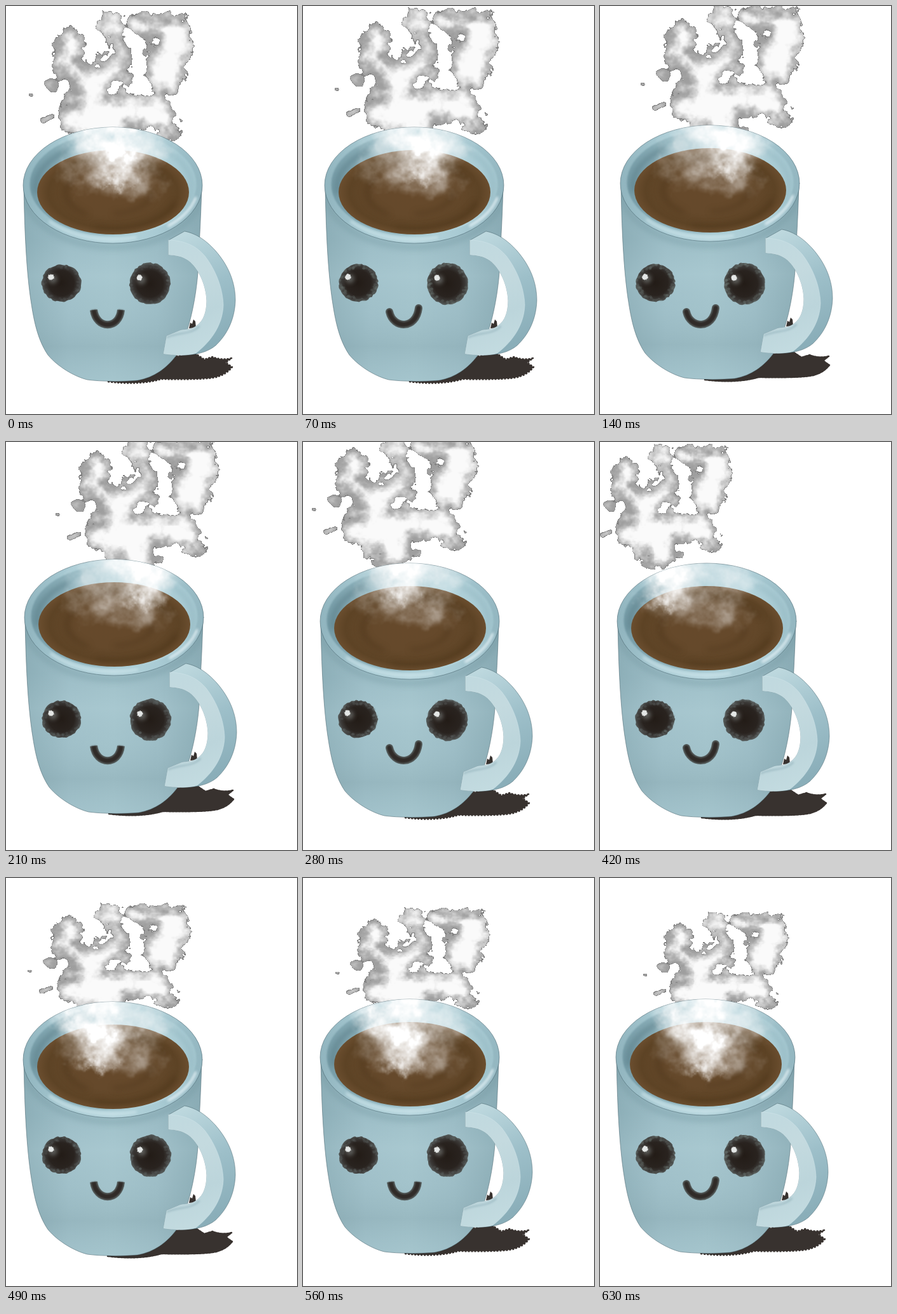
An HTML page with a canvas that plays this animation: 458 by 643 pixels, repeating every 700 ms.

```html
<!DOCTYPE html>
<html lang="en">
<head>
<meta charset="utf-8">
<title>Steaming mug</title>
<style>
  html, body { margin: 0; width: 100%; height: 100%; overflow: hidden; background: #fff; }
  canvas { display: block; }
</style>
</head>
<body>
<canvas id="stage" width="458" height="643"></canvas>
<script>
const W = 458, H = 643, STEP = 70, STEPS = 10;
const ctx = document.getElementById('stage').getContext('2d');
const clamp = v => Math.max(0, Math.min(1, v));
const smooth = v => { v = clamp(v); return v * v * (3 - 2 * v); };
const mix = (a, b, t) => a + (b - a) * t;

// --- noise ---
function hash(x, y) {
  let h = Math.imul(x, 374761393) ^ Math.imul(y, 668265263);
  h = Math.imul(h ^ (h >>> 13), 1274126177);
  return ((h ^ (h >>> 16)) >>> 0) / 4294967296;
}
function noise(x, y) {
  const i = Math.floor(x), j = Math.floor(y), u = smooth(x - i), v = smooth(y - j);
  return mix(mix(hash(i, j), hash(i + 1, j), u), mix(hash(i, j + 1), hash(i + 1, j + 1), u), v);
}
// fractal noise, about -1..1
function fbm(x, y, size) {
  let sum = 0, amp = 1;
  for (let o = 0; o < 4; o++, amp *= 0.58, size /= 2) sum += amp * (noise(x / size + o * 17, y / size + o * 31) - 0.5);
  return sum * 1.5;
}

// Builds a sprite from a rule returning [grey, alpha 0..1].
function sprite(w, h, rule) {
  const c = document.createElement('canvas');
  c.width = w; c.height = h;
  const g = c.getContext('2d'), img = g.createImageData(w, h);
  for (let y = 0, p = 0; y < h; y++) for (let x = 0; x < w; x++, p += 4) {
    const [v, a] = rule(x, y);
    img.data[p] = img.data[p + 1] = img.data[p + 2] = v;
    img.data[p + 3] = a * 255;
  }
  g.putImageData(img, 0, 0);
  return c;
}

// --- steam above the rim: strands through points x, y, radius ---
const strands = [
  [[167, 33, 22], [184, 70, 9], [186, 92, 11]],
  [[204, 27, 16], [264, 42, 26], [250, 108, 32], [262, 132, 10]],
  [[104, 54, 19], [98, 88, 20], [130, 122, 31], [180, 98, 20]],
  [[130, 122, 31], [126, 168, 30], [160, 205, 34]],
  [[104, 178, 22], [160, 168, 34], [240, 168, 25], [260, 198, 16]],
  [[68, 124, 8], [74, 130, 7]],
  [[58, 180, 6], [72, 172, 5]],
  [[38, 140, 3], [40, 140, 3]]
];
const segments = strands.flatMap(s => s.slice(1).map((b, i) => [s[i], b]));

// Signed distance inside a tapered segment, with a noisy edge.
function inside(x, y, [a, b], n) {
  const dx = b[0] - a[0], dy = b[1] - a[1];
  const t = clamp(((x - a[0]) * dx + (y - a[1]) * dy) / (dx * dx + dy * dy));
  const r = mix(a[2], b[2], t);
  return r - Math.hypot(x - a[0] - dx * t, y - a[1] - dy * t) + n * Math.min(13, r * 0.7);
}
const cloud = sprite(320, 245, (x, y) => {
  const n = fbm(x, y, 24);
  const depth = 4 * Math.log(segments.reduce((sum, s) => sum + Math.exp(inside(x, y, s, n) / 4), 0));
  if (depth < 0) return [0, 0];
  const t = smooth(depth / 30 + 0.15 + fbm(x + 400, y, 30) * 0.3);
  return [depth < 1 ? 130 : mix(158, 250, t), 1];
});

// --- steam inside the cup ---
const plume = sprite(200, 150, (x, y) => {
  const up = 140 - y, u = x - 100 - fbm(x, y, 30) * 18;
  const w = 26 + 26 * Math.sqrt(clamp(up / 60)) + Math.max(0, up - 55) * 0.4;
  const a = smooth(1.25 - Math.abs(u) / w) * smooth((up + fbm(x, y + 90, 18) * 16) / 30);
  return [255, clamp(a * (0.82 + fbm(x + 50, y, 24) * 0.5))];
});
const haze = sprite(220, 160, (x, y) => {
  const d = Math.hypot((x - 110) / 98, (y - 40) / 88);
  return [248, clamp(smooth((1.1 - d + fbm(x + 90, y, 36) * 0.3) * 1.6) * (0.36 + fbm(x, y + 30, 24) * 0.22))];
});

// --- drawing helpers ---
function gradient(x0, y0, x1, y1, ...stops) {
  const g = ctx.createLinearGradient(x0, y0, x1, y1);
  stops.forEach((c, i) => g.addColorStop(i / (stops.length - 1), c));
  return g;
}
function radial(r, ...stops) {
  const g = ctx.createRadialGradient(0, 0, 0, 0, 0, r);
  stops.forEach(([at, c]) => g.addColorStop(at, c));
  return g;
}
function arc(x, y, rx, ry, from = 0, to = Math.PI * 2) {
  const p = new Path2D();
  p.ellipse(x, y, rx, ry, 0, from, to);
  return p;
}
function paint(path, fill, stroke, width = 1) {
  if (fill) { ctx.fillStyle = fill; ctx.fill(path); }
  if (stroke) { ctx.strokeStyle = stroke; ctx.lineWidth = width; ctx.stroke(path); }
}
function blurred(px, draw) {
  ctx.save();
  ctx.filter = `blur(${px}px)`;
  draw();
  ctx.restore();
}
function ragged(rx, ry, jag, seed) {
  const p = new Path2D(), turn = Math.PI / 45;
  for (let i = 0; i < 90; i++) {
    const k = 1 - jag * noise(i / 1.7, seed);
    p.lineTo(Math.cos(i * turn) * rx * k, Math.sin(i * turn) * ry * k);
  }
  p.closePath();
  return p;
}

// --- mug ---
const body = new Path2D('M28 282C29 350 32 420 40 470C46 510 54 532 66 550C82 569 108 584 128 589C150 592 185 592 207 590C234 585 252 571 267 552C288 520 299 460 302 420C304 375 307 330 308 282Z');
const rim = arc(168, 282.5, 141, 91.5);
const well = arc(168.5, 281, 131, 81.5);
const coffee = arc(168.5, 293.5, 119.5, 66.5);
const innerEdge = 'L253 520L275 511L290 509C309 503 316 486 316 464C315 440 304 414 287 401C277 394 267 393 256 392Z';
const handleBack = new Path2D('M256 369L281 355C297 358 313 367 330 386C350 409 361 435 361 464C360 493 349 517 330 535C312 550 283 553 248 548' + innerEdge);
const handleFront = new Path2D('M256 369C283 370 299 378 313 394C330 416 341 444 342 471C341 500 326 526 299 547C287 551 268 551 248 548' + innerEdge);
const spike = new Path2D('M288 508L290 499L293 501L295 494L298 497L299 507Z');
const shadow = new Path2D('M160 592Q220 560 262 553T300 549L312 557L325 553Q340 559 355 555L346 562L356 569Q345 583 325 586T245 588Q210 598 160 592Z');

function drawMug() {
  ctx.lineJoin = 'round';
  ctx.setLineDash([3, 2]);
  paint(shadow, '#38322f', '#38322f', 2.5);
  ctx.setLineDash([]);
  paint(spike, '#38322f');
  paint(body, gradient(28, 0, 308, 0, '#90b1ba', '#a2c2cb', '#a6c6ce', '#9fbfc8', '#8cadb6'), 'rgba(70,95,104,.55)');
  ctx.save();
  ctx.clip(body);
  ctx.fillStyle = gradient(0, 370, 0, 592, 'rgba(120,158,168,.14)', 'rgba(180,210,217,.15)', 'rgba(140,172,180,.1)', 'rgba(120,152,160,.28)', 'rgba(160,194,202,.2)');
  ctx.fillRect(0, 280, W, 320);
  blurred(5, () => paint(arc(168, 288, 141, 92), null, 'rgba(100,136,148,.32)', 8));
  ctx.restore();

  paint(rim, gradient(27, 0, 309, 0, '#90b4be', '#a9cbd4', '#b6d5dd', '#a9cbd4', '#93b6c0'), 'rgba(75,104,114,.6)');
  ctx.lineCap = 'round';
  blurred(2, () => {
    paint(arc(168, 282, 134, 85, 0.25, 0.85), null, 'rgba(228,243,247,.85)', 5);
    paint(arc(168, 282, 134, 86, 1.3, 2.4), null, 'rgba(208,231,237,.75)', 4);
  });
  blurred(1, () => paint(well, gradient(38, 290, 299, 240, '#769ca7', '#8cb0ba', '#aacdd6', '#b4d4dc', '#a2c5ce')));
  blurred(4, () => {
    paint(arc(168, 284, 124, 75, -0.9, 0.45), null, 'rgba(128,166,178,.45)', 5);
    paint(arc(168, 286, 121, 72, 3.05, 4.05), null, 'rgba(80,114,125,.5)', 9);
  });
  drawCoffee();

  paint(handleBack, gradient(280, 360, 350, 520, '#bdd8de', '#9dbfc9', '#8aaeb9'), 'rgba(75,104,114,.55)');
  paint(handleFront, gradient(256, 370, 325, 545, '#c0d9df', '#c4dadf', '#bcd5db', '#c4dce1'), 'rgba(208,229,234,.6)');
  blurred(1.5, () => paint(new Path2D('M254 522C272 514 292 518 304 505'), null, 'rgba(130,164,175,.6)', 2));
}

function drawCoffee() {
  ctx.save();
  ctx.clip(coffee);
  ctx.translate(168.5, 293.5);
  ctx.scale(1, 0.557);
  ctx.fillStyle = radial(120, [0, '#66492b'], [0.55, '#65492b'], [0.85, '#5d4325'], [1, '#6b4e2f']);
  ctx.fillRect(-125, -125, 250, 250);
  ctx.filter = 'blur(5px)';
  for (let i = 0; i < 4; i++) {
    const r = 60 + i * 14, from = i * 2.2;
    paint(arc(0, 0, r, r, from, from + 1.5), null, 'rgba(62,40,16,.28)', 10);
  }
  ctx.restore();
}

// --- face ---
// tilt bends the mouth to one side, halo lightens the brushed rim of the eyes
const faces = {
  A: { tilt: 0, halo: 0.4 },
  B: { tilt: 1, halo: 1 },
  C: { tilt: 0, halo: 0.7 },
  D: { tilt: 1, halo: 0.8 }
};

function drawEye(x, y, rx, ry, halo, seed) {
  ctx.save();
  ctx.translate(x + hash(seed, 3) - 0.5, y + hash(seed, 4) - 0.5);
  paint(ragged(rx, ry, 0.07, seed), radial(rx, [0, '#231c17'], [0.62, '#29231f'], [0.84, '#3c3a38'], [1, '#59605f']));
  for (let k = 0; k < 60; k++) {
    const a = hash(k, seed) * 6.283, d = 0.76 + 0.18 * hash(k, seed + 40);
    paint(arc(Math.cos(a) * rx * d, Math.sin(a) * ry * d, 2.4, 2), `rgba(112,122,121,${0.26 * halo})`);
  }
  ctx.translate(-16.5, -9.5);
  blurred(3, () => paint(arc(3, 3, 7, 7), 'rgba(135,140,138,.55)'));
  paint(ragged(5.5, 5.5, 0.35, seed), '#e4e7e6');
  ctx.restore();
}

function drawFace(key) {
  const { tilt, halo } = faces[key], seed = key.charCodeAt(0);
  drawEye(87, 436.5, 32, 30.5, halo, seed);
  drawEye(227, 438, 33.5, 34, halo, seed + 9);
  const mouth = new Path2D(`M${138 - 2 * tilt} ${479 + 3 * tilt}C142 ${510 - tilt} 178 510 ${181 + tilt} ${479 - 3 * tilt}`);
  ctx.lineCap = tilt ? 'round' : 'butt';
  paint(mouth, null, 'rgba(72,74,72,.8)', 12);
  blurred(1, () => paint(mouth, null, '#302b28', 8));
}

// --- motion ---
const faceOrder = 'ABBCDDDCCB';
const shake = { 1: [7, 0], 2: [5, -3], 3: [2, -6], 7: [0, 4], 9: [-2, 0] };
// Each gust carries the cloud evenly between two places: x, y, width.
const gusts = [
  { first: 0, last: 3, from: [0, 0, 1], to: [41, -23, 0.99], lean: 0 },
  { first: 4, last: 6, from: [-21, -30, 1.01], to: [-69, -21, 0.86], lean: 0 },
  { first: 7, last: 9, from: [-3, 13, 0.99], to: [17, 21, 0.88], lean: -26 }
];
const heart = [163.5, 105.5];

function drawStep(step) {
  const gust = gusts.find(g => step <= g.last);
  const t = (step - gust.first) / (gust.last - gust.first);
  const [dx, dy, wide] = gust.from.map((v, i) => mix(v, gust.to[i], t));
  const [mx, my] = shake[step] || [0, 0];
  const tipX = 172 + dx + gust.lean, tipY = 298 + dy * 1.15;

  ctx.fillStyle = '#fff';
  ctx.fillRect(0, 0, W, H);

  ctx.save();
  ctx.imageSmoothingEnabled = false;
  ctx.translate(heart[0] + dx, heart[1] + dy);
  ctx.scale(wide, 1 - 0.028 * step);
  ctx.drawImage(cloud, -heart[0], -heart[1]);
  ctx.restore();

  ctx.save();
  ctx.translate(mx, my);
  drawMug();
  ctx.clip(rim);
  ctx.translate(-mx, -my);
  ctx.drawImage(haze, 70 + dx * 0.2, 180 + dy * 0.4);
  ctx.drawImage(plume, tipX - 100, tipY - 140);
  ctx.restore();

  drawFace(faceOrder[step]);
}

// Render each step once, then pick by time.
const stills = Array.from({ length: STEPS }, (_, step) => {
  drawStep(step);
  const c = document.createElement('canvas');
  c.width = W; c.height = H;
  c.getContext('2d').drawImage(ctx.canvas, 0, 0);
  return c;
});
const start = performance.now();
function tick() {
  const step = Math.floor((performance.now() - start) / STEP) % STEPS;
  ctx.drawImage(stills[step], 0, 0);
  requestAnimationFrame(tick);
}
tick();
</script>
</body>
</html>
```
